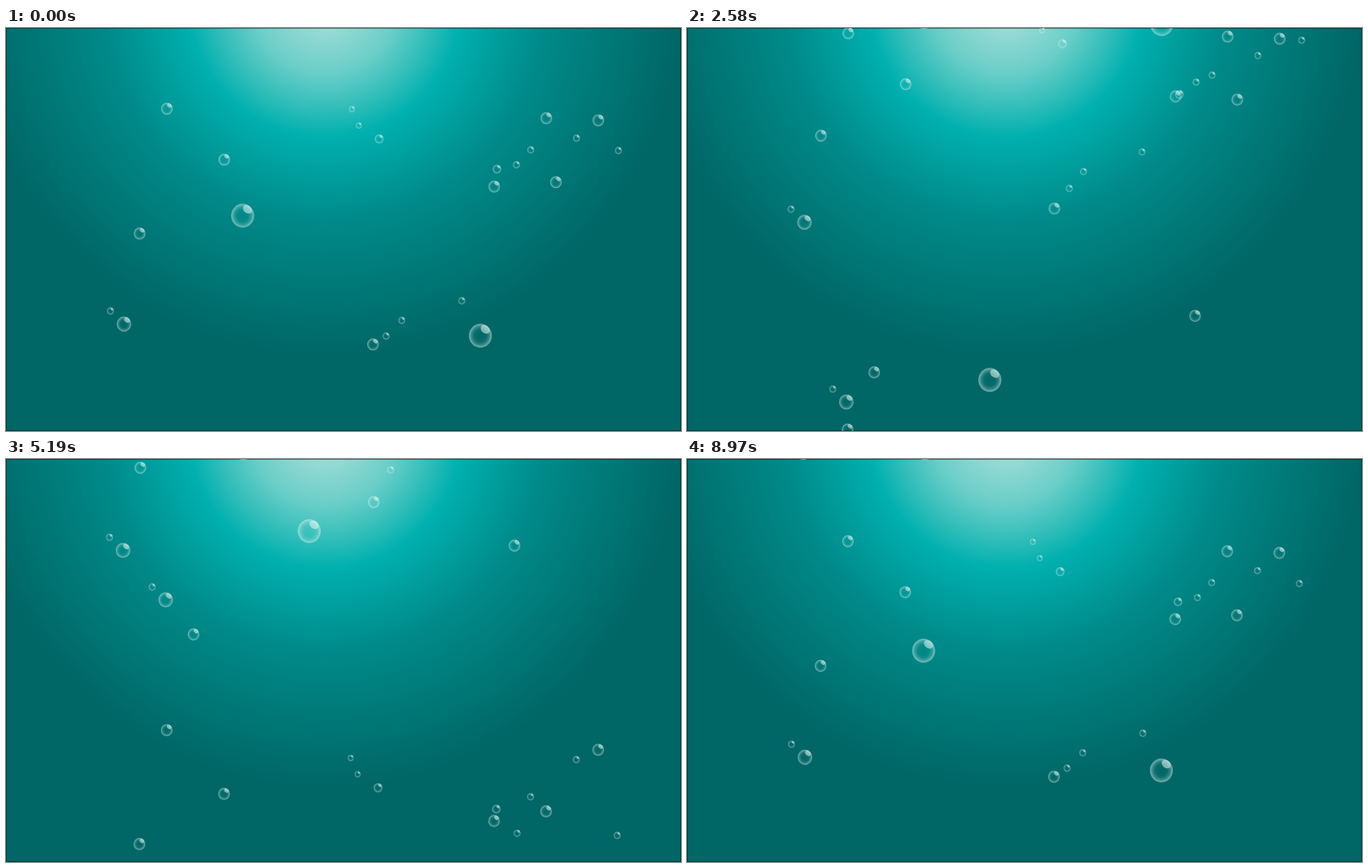
Write an HTML page with a canvas that moves like this. It is 927 by 554 pixels and loops after 9 s.

```html
<!DOCTYPE html>
<html lang="en">
<head>
<meta charset="utf-8">
<title>Rising bubbles</title>
<style>
html, body { margin: 0; width: 100%; height: 100%; overflow: hidden; background: #006766; }
canvas { display: block; }
</style>
</head>
<body>
<canvas id="stage" width="927" height="554"></canvas>
<script>
const W = 927, H = 554, LOOP = 9000, STEP = 30;
const TINY = 4.7, SMALL = 8, MID = 10, BIG = 15.8;
const SQUASH = 1.04;
const ctx = document.getElementById('stage').getContext('2d');
const tracks = [];

// A straight climb through (x, y) at time t; speeds in px per second.
function climb(r, x, y, t, speed, drift, rest = -Infinity) {
  tracks.push({ r, x, y, t, speed, drift, rest });
}

// A bubble that leaves at the top at one speed and returns from below at another,
// so that the loop closes at (x, y). A lingering one halts with its rim in view.
function cycle(r, x, y, out, back, { drift = 0.2, linger = false } = {}) {
  climb(r, x, y, 0, out, drift, linger ? 1.2 - r * SQUASH : undefined);
  climb(r, x, y, LOOP, back, drift * 0.35);
}

// A bubble seen once per loop, passing mid-height at time t.
function pass(r, x, t, speed) {
  climb(r, x, H / 2, t, speed, 0.2);
}

// left
cycle(SMALL, 221, 111, 40.2, 68.7);
cycle(SMALL, 299.7, 181, 40.2, 73.3);
cycle(SMALL, 183.5, 282.5, 52.1, 64.8);
cycle(TINY, 143.5, 389, 54.2, 100.6, { drift: -0.25 });
cycle(MID, 162, 407, 54.2, 100.6, { drift: -0.25, linger: true });
cycle(BIG, 325, 258, 176, 184, { linger: true });

// chain near the light
cycle(4, 475, 111.5, 50.7, 78.6, { drift: 1.2 });
cycle(4, 484.5, 134, 50.7, 78.6, { drift: 1.2 });
cycle(6, 512.5, 152.5, 50.7, 78.6, { drift: 1.2 });

// right
cycle(SMALL, 742, 124, 43.5, 94.6);
cycle(SMALL, 813.5, 127, 43.5, 71.6);
cycle(SMALL, 755.2, 212, 44, 94.5);
cycle(SMALL, 670.5, 218, 48, 73.4);
cycle(5.8, 674.3, 194, 39.8, 75.4, { drift: 0.7 });
cycle(TINY, 720.6, 167.5, 39.8, 77.9);
cycle(TINY, 701, 188, 44, 85.7, { drift: -0.7 });
cycle(TINY, 783.5, 151.5, 44, 68.7);
cycle(TINY, 841, 168.5, 58.8, 91.6, { drift: 1.2 });

// lower middle
cycle(TINY, 626, 375, 79.3, 65.5, { drift: -0.4 });
cycle(TINY, 543.5, 402, 79.3, 63.3, { drift: 0.4 });
cycle(TINY, 522, 423.5, 78.7, 49.8, { drift: 1.2 });
cycle(SMALL, 504, 435, 72.4, 60.4);
cycle(BIG, 651.5, 423, 166, 170);

pass(SMALL, 698, 3700, 106);
pass(BIG, 416.2, 3983, 147.4);
pass(TINY, 200.6, 4367, 122.8);
pass(MID, 219.2, 4511, 122.8);
pass(SMALL, 257.5, 4787, 89);

function radial(x, y, r, stops) {
  const g = ctx.createRadialGradient(x, y, 0, x, y, r);
  for (const at in stops) g.addColorStop(+at, stops[at]);
  return g;
}

const white = a => `rgba(225,245,242,${a})`;

const water = radial(438, -38, 488, {
  0: '#a6ded7',
  0.08: '#98dbd3',
  0.205: '#6acec8',
  0.307: '#30bdb9',
  0.385: '#00b0af',
  0.62: '#008a89',
  1: '#006766'
});

const rim = radial(0, 0, 1, {
  0: white(0),
  0.5: white(0.03),
  0.75: white(0.2),
  0.9: white(0.42),
  1: white(0.46)
});

function drawWater() {
  ctx.fillStyle = water;
  ctx.fillRect(0, 0, W, H);
  ctx.strokeStyle = 'rgba(0,0,0,0.5)';
  ctx.strokeRect(0.5, 0.5, W - 1, H - 1);
}

function fillEllipse(x, y, rx, ry, turn, paint) {
  ctx.fillStyle = paint;
  ctx.beginPath();
  ctx.ellipse(x, y, rx, ry, turn, 0, Math.PI * 2);
  ctx.fill();
}

function drawBubble(x, y, r) {
  ctx.save();
  ctx.translate(x, y);
  ctx.scale(r, r * SQUASH);
  fillEllipse(0, 0, 1, 1, 0, rim);
  fillEllipse(0.42, -0.53, 0.43, 0.32, 0.62, white(0.54));
  ctx.restore();
}

function render(t) {
  drawWater();
  for (const b of tracks) {
    const s = (t - b.t) / 1000;
    const y = Math.max(b.rest, b.y - b.speed * s);
    if (y > -20 && y < H + 20) drawBubble(b.x + b.drift * s, y, b.r);
  }
}

const start = performance.now();
function tick() {
  const t = (performance.now() - start) % LOOP;
  render(Math.floor(t / STEP) * STEP);
  requestAnimationFrame(tick);
}
tick();
</script>
</body>
</html>
```
